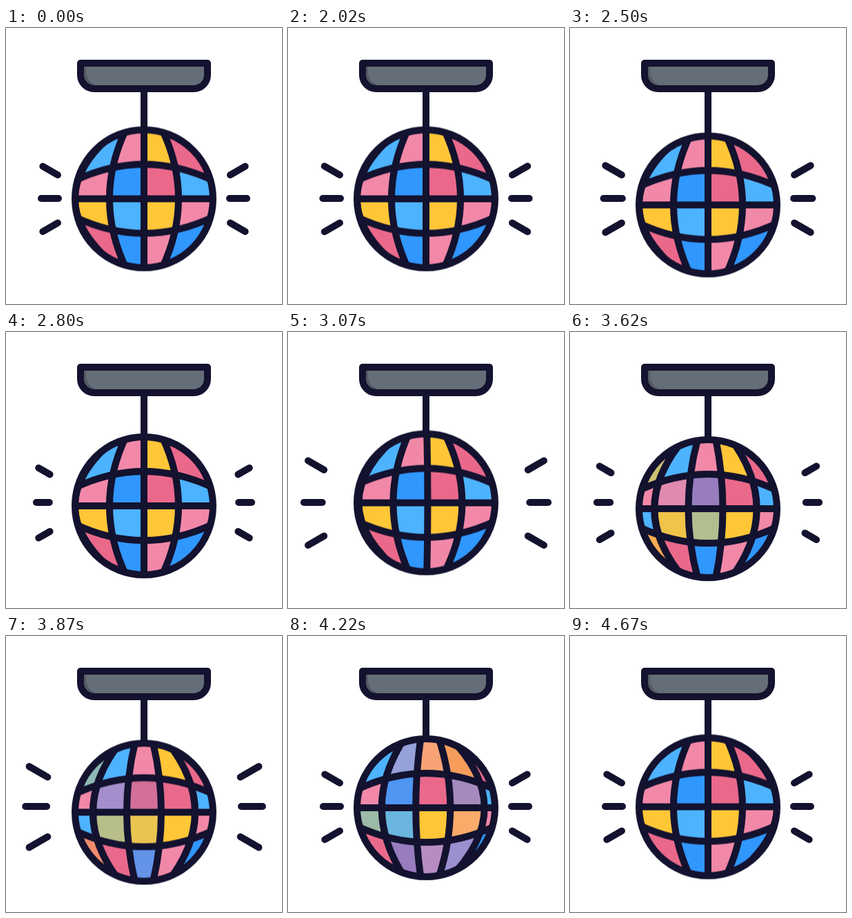
An HTML page without scripts for the animation above (4700 ms loop, 400 px wide and 400 px high).

```html
<!DOCTYPE html>
<html lang="en">
<head>
<meta charset="utf-8">
<title>Disco ball</title>
<style>
  :root {
    --ink: #13122f;
    --blue: #3097ff;
    --sky: #4db3ff;
    --pink: #f288a8;
    --rose: #ea698b;
    --gold: #ffc637;
    --sine: cubic-bezier(.37, 0, .63, 1);
  }
  html, body { margin: 0; width: 100%; height: 100%; overflow: hidden; background: #fff; }
  svg { display: block; width: 100vw; height: 100vh; }
  .ink { fill: none; stroke: var(--ink); stroke-width: 10; stroke-linecap: round; stroke-linejoin: round; }

  .ball { animation: bob 4.7s var(--sine) infinite; }
  @keyframes bob {
    0%, 42.55%, 65.25%, 93.6%, to { transform: translateY(0); }
    53.9%, 79.1% { transform: translateY(9px); }
  }

  /* The outer tip moves by path, the inner tip follows by dash offset. */
  .ray {
    d: path("M0 0H-25");
    stroke-dasharray: 100;
    animation: outer 4.7s var(--sine) infinite, inner 4.7s var(--sine) 30ms infinite;
  }
  @keyframes outer {
    0%, 42.55%, 52.4%, 61.06%, 69.94%, 79.26%, 88.6%, to { d: path("M0 0H-25"); }
    47.4%, 56.7%, 65.4%, 74.4%, 83.6% { d: path("M0 0H-53"); }
  }
  @keyframes inner {
    0%, 42.55%, 52.4%, 61.06%, 69.94%, 79.26%, 88.6%, to { stroke-dashoffset: 0; }
    47.4%, 56.7%, 65.4%, 74.4%, 83.6% { stroke-dashoffset: -28; }
  }

  /* Each meridian travels one column to the right. */
  .turn path {
    fill: var(--a);
    animation: var(--m, none) 4.7s var(--sine) infinite, var(--t, none) 4.7s linear infinite;
  }
  .turn .ink path { fill: none; }
  .m0 { d: path("M-120 -110H120V110H-120Z"); }
  .m1 { --m: m1; }
  .m2 { --m: m2; }
  .m3 { --m: m3; }
  .m4 { --m: m4; }
  @keyframes m1 {
    0%, 61% { d: path("M-25 -110Q-175 0 -25 110H150V-110Z"); }
    82.28% { d: path("M-27 -110Q-121 0 -27 110H150V-110Z"); }
    99.3%, to { d: path("M-21.5 -110Q-78.5 0 -21.5 110H150V-110Z"); }
  }
  @keyframes m2 {
    0%, 61% { d: path("M-21.5 -110Q-78.5 0 -21.5 110H150V-110Z"); }
    82.28% { d: path("M-10.8 -110Q-39.2 0 -10.8 110H150V-110Z"); }
    99.3%, to { d: path("M0 -110Q0 0 0 110H150V-110Z"); }
  }
  @keyframes m3 {
    0%, 61% { d: path("M0 -110Q0 0 0 110H150V-110Z"); }
    82.28% { d: path("M10.8 -110Q39.2 0 10.8 110H150V-110Z"); }
    99.3%, to { d: path("M21.5 -110Q78.5 0 21.5 110H150V-110Z"); }
  }
  @keyframes m4 {
    0%, 61% { d: path("M21.5 -110Q78.5 0 21.5 110H150V-110Z"); }
    82.28% { d: path("M27 -110Q121 0 27 110H150V-110Z"); }
    99.3%, to { d: path("M25 -110Q175 0 25 110H150V-110Z"); }
  }

  /* Tile tints: --a fades to --b, at a moment set by the class. */
  .blue { --a: var(--blue); }
  .sky { --a: var(--sky); }
  .pink { --a: var(--pink); }
  .rose { --a: var(--rose); }
  .gold { --a: var(--gold); }
  .to-blue { --b: var(--blue); }
  .to-sky { --b: var(--sky); }
  .to-pink { --b: var(--pink); }
  .to-rose { --b: var(--rose); }
  .to-gold { --b: var(--gold); }
  .first { --t: first; }
  .edge { --t: edge; }
  .second { --t: second; }
  .third { --t: third; }
  .last { --t: last; }
  @keyframes first { 0%, 67.55% { fill: var(--a); } 84.6%, to { fill: var(--b); } }
  @keyframes edge { 0%, 72.34% { fill: var(--a); } 88.3%, to { fill: var(--b); } }
  @keyframes second { 0%, 75.53% { fill: var(--a); } 92.55%, to { fill: var(--b); } }
  @keyframes third { 0%, 77.9% { fill: var(--a); } 94.9%, to { fill: var(--b); } }
  @keyframes last { 0%, 82.3% { fill: var(--a); } 99.3%, to { fill: var(--b); } }
</style>
</head>
<body>
<svg viewBox="0 0 400 400">
  <defs>
    <path id="north" d="M-110 -21.5Q0 -78.5 110 -21.5V110H-110Z"/>
    <path id="equator" d="M-110 0H110V110H-110Z"/>
    <path id="south" d="M-110 21.5Q0 78.5 110 21.5V110H-110Z"/>
    <clipPath id="globe"><circle r="100"/></clipPath>
    <clipPath id="below-north"><use href="#north"/></clipPath>
    <clipPath id="below-equator"><use href="#equator"/></clipPath>
    <clipPath id="below-south"><use href="#south"/></clipPath>
  </defs>

  <g transform="translate(200 247.5)">
    <g class="ink">
      <path class="ray" transform="translate(-125 -34.5) rotate(30)"/>
      <path class="ray" transform="translate(-124 -.5)"/>
      <path class="ray" transform="translate(-125 35) rotate(-30)"/>
    </g>
    <g class="ink" transform="scale(-1 1)">
      <path class="ray" transform="translate(-125 -34.5) rotate(30)"/>
      <path class="ray" transform="translate(-124 -.5)"/>
      <path class="ray" transform="translate(-125 35) rotate(-30)"/>
    </g>
    <g class="ball">
      <path class="ink" d="M0 -185V-100"/>
      <g class="turn" clip-path="url(#globe)">
        <g>
          <path class="m0 gold to-sky edge"/>
          <path class="m1 sky to-pink last"/>
          <path class="m2 pink to-gold last"/>
          <path class="m3 gold to-rose last"/>
          <path class="m4 rose"/>
        </g>
        <g clip-path="url(#below-north)">
          <path class="m0 pink"/>
          <path class="m1 pink to-blue second"/>
          <path class="m2 blue to-rose first"/>
          <path class="m3 rose to-sky last"/>
          <path class="m4 sky"/>
        </g>
        <g clip-path="url(#below-equator)">
          <path class="m0 sky to-gold last"/>
          <path class="m1 gold to-sky second"/>
          <path class="m2 sky to-gold first"/>
          <path class="m3 gold to-pink last"/>
          <path class="m4 pink"/>
        </g>
        <g clip-path="url(#below-south)">
          <path class="m0 gold to-rose edge"/>
          <path class="m1 rose to-blue last"/>
          <path class="m2 blue to-pink third"/>
          <path class="m3 pink to-blue last"/>
          <path class="m4 blue"/>
        </g>
        <g class="ink">
          <path class="m1"/>
          <path class="m2"/>
          <path class="m3"/>
          <path class="m4"/>
          <use href="#north"/>
          <use href="#equator"/>
          <use href="#south"/>
        </g>
      </g>
      <circle class="ink" r="100"/>
    </g>
  </g>

  <path fill="#656e78" d="M108 51H292V68a20 20 0 0 1-20 20H128a20 20 0 0 1-20-20Z"/>
  <path fill="#535a64" d="M108 51h8v12a21 21 0 0 0 21 21v4h-9a20 20 0 0 1-20-20Z"/>
  <path class="ink" d="M108 51H292V68a20 20 0 0 1-20 20H128a20 20 0 0 1-20-20Z"/>
</svg>
</body>
</html>
```
